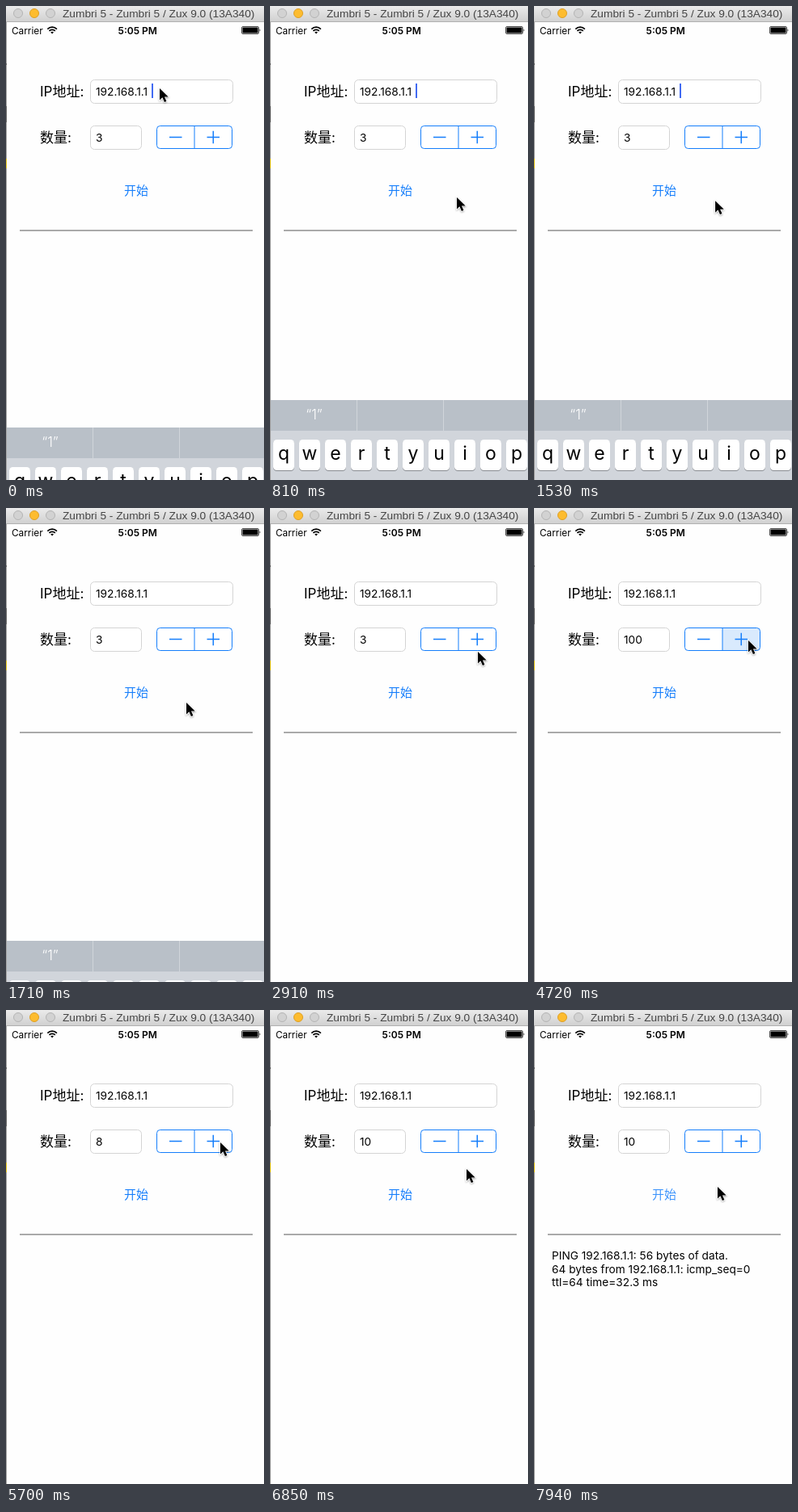
Animation, 319 px wide and 587 px high, one loop 7.99 s. Source, as an HTML page:

```html
<!DOCTYPE html>
<html lang="zh">
<head>
<meta charset="utf-8">
<title>Ping</title>
<style>
html, body { margin: 0; width: 100%; height: 100%; overflow: hidden; background: #fefefe; }
svg { display: block; width: 100%; height: 100%; }
text { font-family: Inter, "Noto Sans CJK SC", "Noto Sans CJK", sans-serif; fill: #000; white-space: pre; }
.mid { text-anchor: middle; }
.blue { fill: #157efb; }
.label { font-size: 17px; }
.field { fill: #fff; stroke: #d4d4d4; }
.value { font-size: 13.7px; }
.log { font-size: 13.7px; }
</style>
</head>
<body>
<svg viewBox="0 0 319 587">
  <defs>
    <linearGradient id="bar" x2="0" y2="1">
      <stop stop-color="#ebebeb"/><stop offset="1" stop-color="#d0d0d0"/>
    </linearGradient>
    <filter id="soft" x="-50%" y="-50%" width="200%" height="200%">
      <feDropShadow dx="0" dy="1" stdDeviation="1" flood-opacity=".4"/>
    </filter>
  </defs>
  <rect width="319" height="587" fill="#fefefe"/>

  <text x="7" y="34.5" font-size="11.8">Carrier</text>
  <g fill="none" stroke="#000" stroke-width="1.7">
    <path d="M51.3 28.6a8.2 8.2 0 0 1 11.6 0M53.4 30.9a5.2 5.2 0 0 1 7.4 0"/>
    <path d="M57.1 34.6l-1.9-2a2.7 2.7 0 0 1 3.8 0z" fill="#000" stroke="none"/>
  </g>
  <text class="mid" x="162.7" y="34.5" font-size="12" font-weight="600">5:05 PM</text>
  <rect x="291.5" y="25.5" width="21" height="9" rx="1.5" fill="none" stroke="#000" stroke-width=".7"/>
  <rect x="292.5" y="26.5" width="19" height="7" rx=".6"/>
  <path d="M313.6 28.3q1.8 1.7 0 3.4z"/>

  <text class="label" x="42" y="111.5">IP地址:</text>
  <text class="label" x="42" y="168.5">数量:</text>
  <rect class="field" x="104.5" y="91.5" width="176" height="29" rx="5"/>
  <rect class="field" x="104.5" y="148.5" width="63" height="29" rx="5"/>
  <text class="value" x="111" y="111">192.168.1.1</text>
  <text class="value" x="111" y="168" id="count"></text>
  <rect id="caret" x="180" y="96" width="2" height="18" fill="#426bf2"/>

  <rect x="186.5" y="148.5" width="93" height="28" rx="4" fill="#fff"/>
  <path id="minus" fill="#d9eafd" d="M233 148.5h-42.500a4 4 0 0 0-4 4v20a4 4 0 0 0 4 4h42.500z"/>
  <path id="plus" fill="#d9eafd" d="M233 148.5h42.500a4 4 0 0 1 4 4v20a4 4 0 0 1-4 4h-42.500z"/>
  <g fill="none" stroke="#157efb">
    <rect x="186.5" y="148.5" width="93" height="28" rx="4"/>
    <path d="M233 148.500v28"/>
    <path d="M202 162.500h15.500M248.500 162.500h15.500M256.250 154.700v15.500" stroke-width="1.5"/>
  </g>

  <text class="blue" id="start" x="146" y="233.500" font-size="15">开始</text>
  <path d="M17 278h288" stroke="#aaa" stroke-width="2"/>
  <text class="log" id="line1" x="22" y="308.500">PING 192.168.1.1: 56 bytes of data.</text>
  <g id="line2">
    <text class="log" x="22" y="325.500">64 bytes from 192.168.1.1: icmp_seq=0</text>
    <text class="log" x="22" y="342">ttl=64 time=32.3 ms</text>
  </g>

  <g id="keyboard">
    <rect width="319" height="110" fill="#d1d5db"/>
    <rect width="319" height="38" fill="#b9c0c8"/>
    <path d="M107.500 0v38M214.500 0v38" stroke="#d0d5da"/>
    <text class="mid" x="54.500" y="24" font-size="17" font-weight="300" style="fill:#fff">“1”</text>
    <g id="keys"></g>
  </g>

  <path d="M.5 20v567" stroke="#a2a2a2"/>
  <path d="M.5 71v2M.5 124v20" stroke="#666"/>
  <path d="M.5 189v12" stroke="#e3c51c"/>

  <rect width="319" height="19.500" fill="url(#bar)"/>
  <path d="M0 19.500h319" stroke="#b0b0b0"/>
  <g fill="#d2d2d2" stroke="#b4b4b4">
    <circle cx="15" cy="9" r="5.500"/>
    <circle cx="35" cy="9" r="5.500" fill="#fdbc2f" stroke="#dd9f25"/>
    <circle cx="55" cy="9" r="5.500"/>
  </g>
  <text x="70" y="14" font-size="13.7" style="font-family:'Liberation Sans',sans-serif;fill:#454545">Zumbri 5 - Zumbri 5 / Zux 9.0 (13A340)</text>

  <path id="mouse" d="M0 0v14.500l3.400-3.200 2.500 5.700 2.500-1.100-2.400-5.400h4.700z" stroke="#fff" stroke-width="1.200" paint-order="stroke" filter="url(#soft)"/>
</svg>
<script>
const LOOP = 7990;
const $ = id => document.getElementById(id);
const show = (id, on) => $(id).setAttribute('visibility', on ? 'visible' : 'hidden');
const move = (id, x, y) => $(id).setAttribute('transform', `translate(${x} ${y})`);
const clamp = v => Math.min(1, Math.max(0, v));
const smooth = v => v * v * (3 - 2 * v);

$('keys').innerHTML = [...'qwertyuiop'].map((c, i) => {
  const x = 4 + 32 * i;
  return `<rect x="${x}" y="50" width="26" height="38" rx="4.500" fill="#888b90"/>
    <rect x="${x}" y="49" width="26" height="38" rx="4.500" fill="#fff"/>
    <text class="mid" x="${x + 13}" y="74" font-size="23">${c}</text>`;
}).join('');

// pointer stops: time, x, y
const stops = [
  [290, 190, 102], [810, 231, 237], [1060, 229, 242], [1710, 223, 241], [1890, 224, 240],
  [2160, 262, 199], [2580, 262, 199], [2910, 257, 178], [3000, 262, 165], [3220, 262, 165],
  [3360, 222, 164], [4320, 222, 164], [4480, 265, 164], [6650, 265, 164], [6850, 243, 197],
  [7090, 243, 197], [7480, 162, 228], [7690, 162, 228], [7930, 227, 219]
];

// stepper taps: press, release, value after release, button
const taps = [
  [3000, 3080, 4, 'plus'], [3150, 3220, 5, 'plus'],
  [3400, 3480, 4, 'minus'], [3590, 3670, 3, 'minus'],
  [3790, 3870, 100, 'minus'], [4040, 4120, 99, 'minus'],
  [4490, 4570, 100, 'plus'], [4720, 4780, 3, 'plus'], [4870, 4950, 4, 'plus'],
  [5120, 5200, 5, 'plus'], [5290, 5370, 6, 'plus'], [5450, 5540, 7, 'plus'],
  [5620, 5700, 8, 'plus'], [5790, 5870, 9, 'plus'], [5960, 6050, 10, 'plus']
];

function pointer(t) {
  const i = stops.findIndex(s => s[0] > t);
  if (i === 0) return stops[0].slice(1);
  if (i < 0) return stops.at(-1).slice(1);
  const [t0, x0, y0] = stops[i - 1], [t1, x1, y1] = stops[i];
  const p = smooth((t - t0) / (t1 - t0));
  return [x0 + (x1 - x0) * p, y0 + (y1 - y0) * p];
}

function keyboardTop(t) {
  if (t < 80) return 522;
  const s = Math.max(0, t - 1621) * 0.01826;
  return t > 1910 ? 600 : 488 + 99 * (1 - (1 + s) * Math.exp(-s));
}

function draw(t) {
  move('mouse', ...pointer(t));
  move('keyboard', 0, Math.round(keyboardTop(t)));
  show('caret', t < 1621);

  let value = 3, held = '';
  for (const [down, up, next, button] of taps) {
    if (t >= up) value = next;
    else if (t >= down) held = button;
  }
  $('count').textContent = value;
  show('plus', held === 'plus');
  show('minus', held === 'minus');

  const pressed = t >= 7630;
  $('start').setAttribute('opacity', pressed ? 0.2 + 0.8 * clamp((t - 7690) / 320) : 1);
  show('line1', t >= 7690);
  show('line2', t >= 7750);
}

const begin = performance.now();
function tick() {
  draw((performance.now() - begin) % LOOP);
  requestAnimationFrame(tick);
}
draw(0);
requestAnimationFrame(tick);
</script>
</body>
</html>
```
